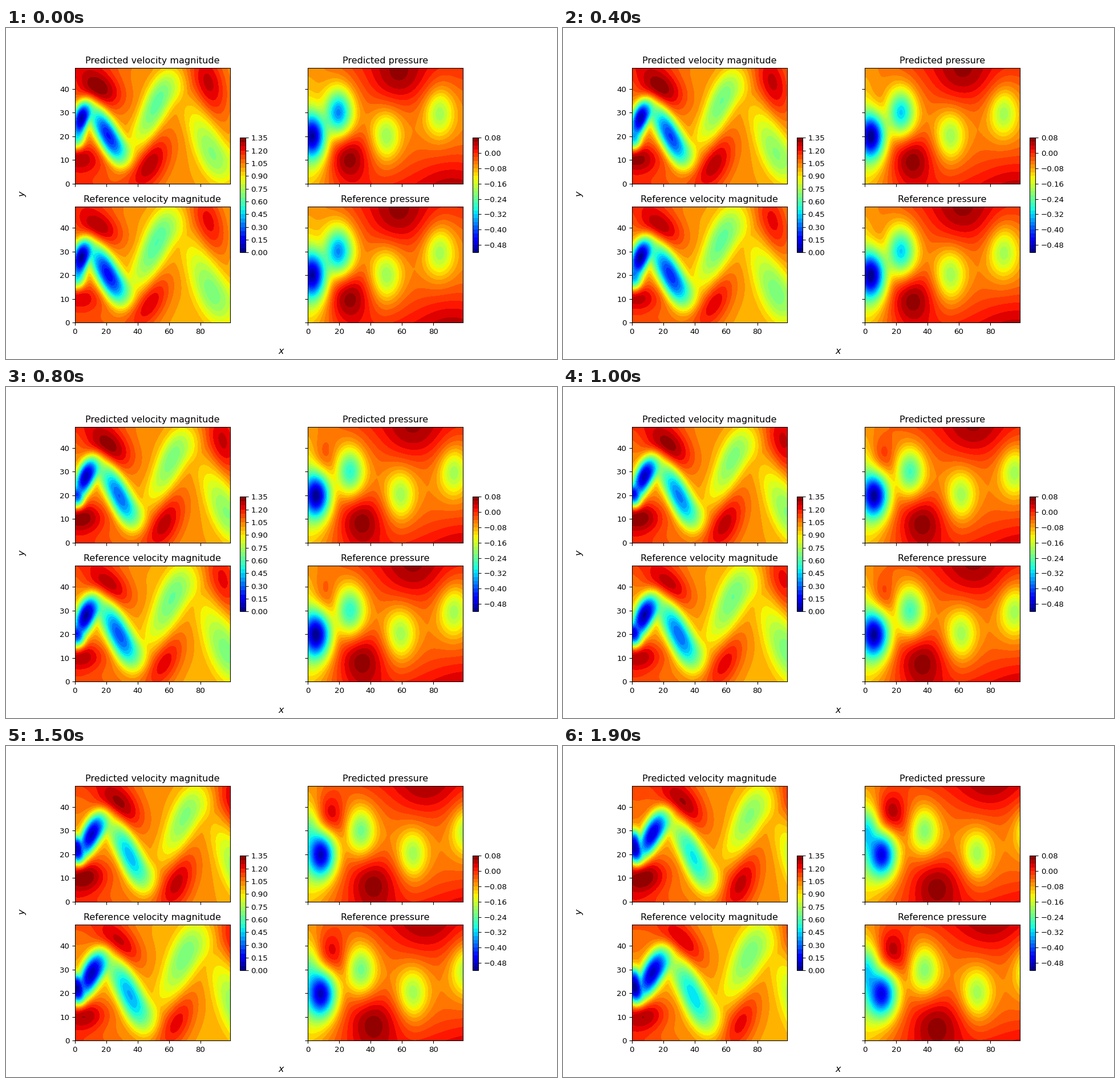
These frames come from a looping animation (966 px wide and 580 px high, 2 s). A matplotlib script:

```python
import numpy as np
import matplotlib.pyplot as plt
from matplotlib.animation import FuncAnimation

STEPS, INTERVAL, DPI = 20, 100, 96
MID = 25        # wake axis
SHED = 30       # steps between vortices of opposite side
X, Y = np.meshgrid(np.arange(100.0), np.arange(50.0))
WALL = ((Y - MID) / 25) ** 2
SPEED_LEVELS = np.arange(28) / 20
PRESSURE_LEVELS = np.arange(-26, 5) / 50
K = np.arange(-1, 5)
SIDE = np.where(K % 2 == 0, -1, 1)


def drift(age):
    """Slow start behind the body, then steady advection."""
    return 14.5 * np.log1p(np.exp((age - 16.5) / 12.7))


def ramp(age, mid, width):
    return 1 / (1 + np.exp(-(age - mid) / width))


def blend(x, y, height, sx, sy, tilt=0.0, p=2, flat=1.0):
    """Merge tilted bumps with a p-norm, so overlaps do not pile up."""
    dx, dy = X[..., None] - x, Y[..., None] - y
    c, s = np.cos(tilt), np.sin(tilt)
    d2 = ((dx * c + dy * s) / sx) ** 2 + ((dy * c - dx * s) / sy) ** 2
    bumps = height * np.exp(-((d2 / 2) ** flat))
    return (bumps**p).sum(axis=-1) ** (1 / p)


def speed(step, base, crest, spread):
    # Fast lobes alternate between the walls and tilt as they age
    age = 33 * K - 8 + step
    fast = blend(drift(age), MID + SIDE * (14 + 0.04 * age),
                 crest * ramp(age, -14, 4) * (1 - 0.0015 * age),
                 11, (5 + 0.025 * age) / spread,
                 np.radians(-0.65 * SIDE * age))

    # Slow fluid fills a meandering ribbon with a core in every swing
    age = np.arange(-14, 120, 2.0)
    label = age - step
    swing = 5 + 12 * np.tanh((age / 50) ** 2)
    y = MID + swing * np.cos(2 * np.pi * (label - 12) / 59)
    contrast = 0.2 + 0.25 * np.clip(age / 75, 0, 1)
    core = 1 - contrast * (1 - np.cos(2 * np.pi * (label - 33) / SHED))
    deficit = (0.9 - 0.6 * ramp(age, 46, 8.5)) * core
    width = spread * (3.6 + 0.028 * np.maximum(age, 0))
    slow = blend(drift(age), y, deficit, width, width, p=12, flat=1.3)

    return base + 0.15 * WALL * np.exp(-((X / 35) ** 2)) + fast - slow


def pressure(step, size):
    age = SHED * K + step
    low = blend(drift(age), MID + 5 * SIDE,
                (0.14 + 0.26 * ramp(-age, -34, 6)) * ramp(age, -11, 5),
                6.3 * size, 7 * size)

    # Each high faces a low across the axis and moves out to the wall
    age = age + 7
    old = np.maximum(age, 0)
    high = blend(drift(age), MID - SIDE * (7 + 0.18 * age),
                 0.14 * ramp(age, 16, 4) * np.exp(-((age / 100) ** 2)),
                 (3 + 0.16 * old) * size, (6 + 0.04 * old) * size)

    near = 0.1 * np.exp(-((X / 11) ** 2) - ((Y - 20) / 20) ** 2)
    wall = 0.055 * WALL * (1 - np.exp(-((X / 25) ** 2)))
    return -0.06 - near + wall + high - low


fig, axes = plt.subplots(2, 2, sharex=True, sharey=True,
                         figsize=(966 / DPI, 580 / DPI), dpi=DPI)
panels = [
    (axes[0, 0], "Predicted velocity magnitude", SPEED_LEVELS,
     lambda step: speed(step, 1.0, 0.31, 1.0)),
    (axes[1, 0], "Reference velocity magnitude", SPEED_LEVELS,
     lambda step: speed(step, 0.98, 0.28, 1.08)),
    (axes[0, 1], "Predicted pressure", PRESSURE_LEVELS,
     lambda step: pressure(step, 1.0)),
    (axes[1, 1], "Reference pressure", PRESSURE_LEVELS,
     lambda step: pressure(step, 1.05)),
]
fills = []


def draw(step):
    while fills:
        fills.pop().remove()
    for ax, _, levels, field in panels:
        margin = (levels[1] - levels[0]) / 10
        z = np.clip(field(step), levels[0] + margin, levels[-1] - margin)
        fills.append(ax.contourf(X, Y, z, levels=levels, cmap="jet"))
    return fills


draw(0)
for ax, title, *_ in panels:
    ax.set_title(title)
    ax.set(xlim=(0, 99), ylim=(0, 49))
for col, fill in ((0, fills[0]), (1, fills[2])):
    fig.colorbar(fill, ax=axes[:, col].tolist(), shrink=0.45)
fig.supxlabel("$x$")
fig.supylabel("$y$", x=0.0225)

anim = FuncAnimation(fig, draw, frames=STEPS, init_func=lambda: draw(0),
                     interval=INTERVAL, repeat=True, blit=False)
plt.show()
```
